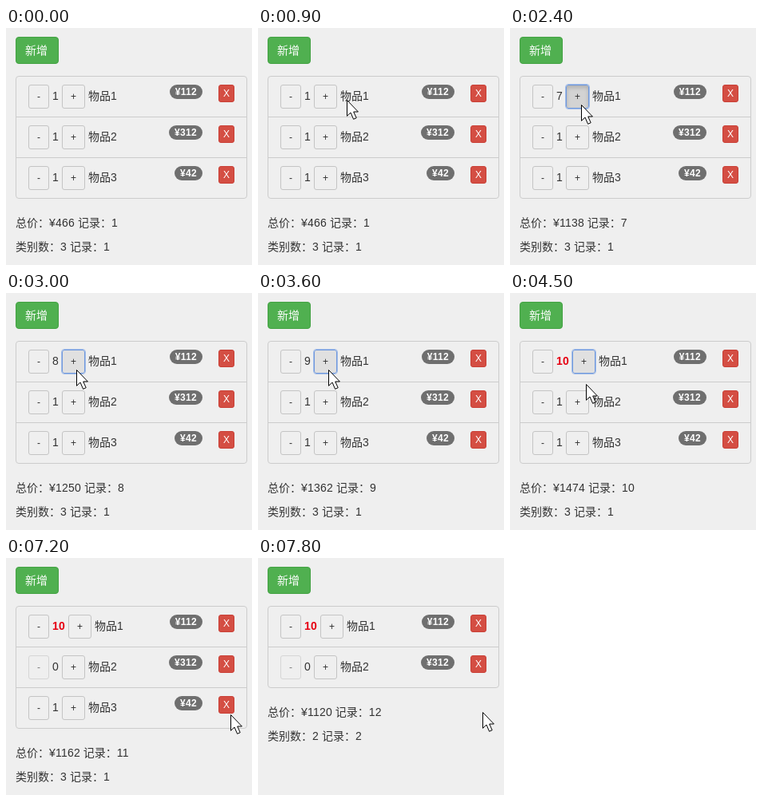
An HTML page for the animation above (8000 ms loop, 308x297 px).

```html
<!DOCTYPE html>
<html lang="zh-CN">
<head>
<meta charset="utf-8">
<style>
* { box-sizing: border-box }
html, body { margin: 0; width: 100%; height: 100%; overflow: hidden }
body { position: relative; background: #efefef; color: #333;
  font: 14px/20px "Liberation Sans", "Noto Sans CJK SC", "Noto Sans CJK", sans-serif }
.add, .list, .badge, .del, .total, #cursor { position: absolute }
.add { left: 12px; top: 11px; width: 54px; height: 34px; padding: 6px 11px;
  border: 1px solid #43a243; border-radius: 4px; background: #50b050; color: #fff; white-space: nowrap }
.list { left: 12px; top: 60px; width: 290px; border: 1px solid #ccc; border-radius: 4px }
.row { position: relative; height: 51px; padding: 10px 15px; display: flex;
  align-items: flex-start; gap: 4px; line-height: 28px; white-space: nowrap }
.row + .row { border-top: 1px solid #ccc }
.row:first-child { height: 50px }
.num { letter-spacing: .214px }
.btn { height: 30px; padding: 5px 10px; border: 1px solid #c4c4c4; border-radius: 3px;
  font-size: 12px; line-height: 18px }
.off { opacity: .6 }
.focus { background: #e0e0e0; border-color: #6f98dd; outline: 1px solid #a3bde8 }
.press { background: #d3d3d3; box-shadow: inset 0 3px 5px rgba(0,0,0,.16) }
.full { color: #e60012; font-weight: bold }
.badge { right: 55px; top: 10px; padding: 3px 7px; border-radius: 10px; letter-spacing: .326px;
  background: #6f6f6f; color: #fff; font: bold 12px/12px "Liberation Sans", sans-serif }
.del { right: 15px; top: 10px; width: 20px; height: 22px; border: 1px solid #c93f36; border-radius: 3px;
  background: #d44e43; color: #fff; font-size: 12px; line-height: 20px; text-align: center }
.total { left: 12px; white-space: nowrap }
#cursor { left: 0; top: 0 }
</style>
</head>
<body>
<div class="add">新增</div>
<div id="app"></div>
<svg id="cursor" width="15" height="25">
  <path d="M.5 .5V20.3L5 16L8.6 24.3L12.2 22.7L8.7 15H14.4Z" fill="#fff" stroke="#000"/>
</svg>
<script>
const LOOP = 8000, PRICES = [112, 312, 42];
const app = document.getElementById('app');
const cursor = document.getElementById('cursor');

// Each step patches the state from its time on.
const steps = [
  [0, { at: null, counts: [1, 1, 1], plus: '', log: 1, kindLog: 1 }],
  [300, { at: [250, 153] }],
  [600, { at: [70, 67] }],
  [900, { at: [111, 90] }],
  [1200, { at: [89, 96] }],
  [1500, { counts: [3, 1, 1], log: 3, plus: 'focus press' }],
  [2100, { counts: [5, 1, 1], log: 5 }],
  [2400, { counts: [7, 1, 1], log: 7 }],
  [2700, { plus: 'focus' }],
  [3000, { counts: [8, 1, 1], log: 8, at: [88, 96] }],
  [3300, { counts: [9, 1, 1], log: 9, plus: 'focus press' }],
  [3600, { plus: 'focus' }],
  [3900, { counts: [10, 1, 1], log: 10, plus: 'focus press' }],
  [4200, { plus: 'focus' }],
  [4500, { at: [95, 114] }],
  [4800, { at: [43, 181] }],
  [5100, { at: [43, 150] }],
  [5400, { at: [44, 145], counts: [10, 0, 1], log: 11, plus: '' }],
  [5700, { at: [86, 215] }],
  [6900, { at: [250, 221] }],
  [7200, { at: [281, 196] }],
  [7500, { at: [281, 194] }],
  [7800, { at: [281, 193], counts: [10, 0], log: 12, kindLog: 2 }]
];

const num = (text, style = '') => `<span class="num ${style}">${text}</span>`;

const row = (n, i, plus) => `<div class="row">
  <span class="btn ${n ? '' : 'off'}">-</span>
  ${num(n, n >= 10 ? 'full' : '')}
  <span class="btn ${i ? '' : plus}">+</span>
  <span>物品${i + 1}</span>
  <span class="badge">¥${PRICES[i]}</span><span class="del">X</span></div>`;

const line = (y, label, value, log) =>
  `<div class="total" style="top:${y}px">${label}：${num(value)} 记录：${num(log)}</div>`;

function render({ at, counts, plus, log, kindLog }) {
  const sum = counts.reduce((s, n, i) => s + n * PRICES[i], 0);
  const y = 81 + 51 * counts.length;
  app.innerHTML = `<div class="list">${counts.map((n, i) => row(n, i, plus)).join('')}</div>` +
    line(y, '总价', '¥' + sum, log) +
    line(y + 30, '类别数', counts.length, kindLog);
  cursor.style.display = at ? 'block' : 'none';
  if (at) cursor.style.transform = `translate(${at[0]}px, ${at[1]}px)`;
}

let shown = 0;
function tick() {
  const t = performance.now() % LOOP;
  const past = steps.filter(s => s[0] <= t);
  if (past.length !== shown) {
    shown = past.length;
    render(Object.assign({}, ...past.map(s => s[1])));
  }
  requestAnimationFrame(tick);
}
tick();
</script>
</body>
</html>
```
